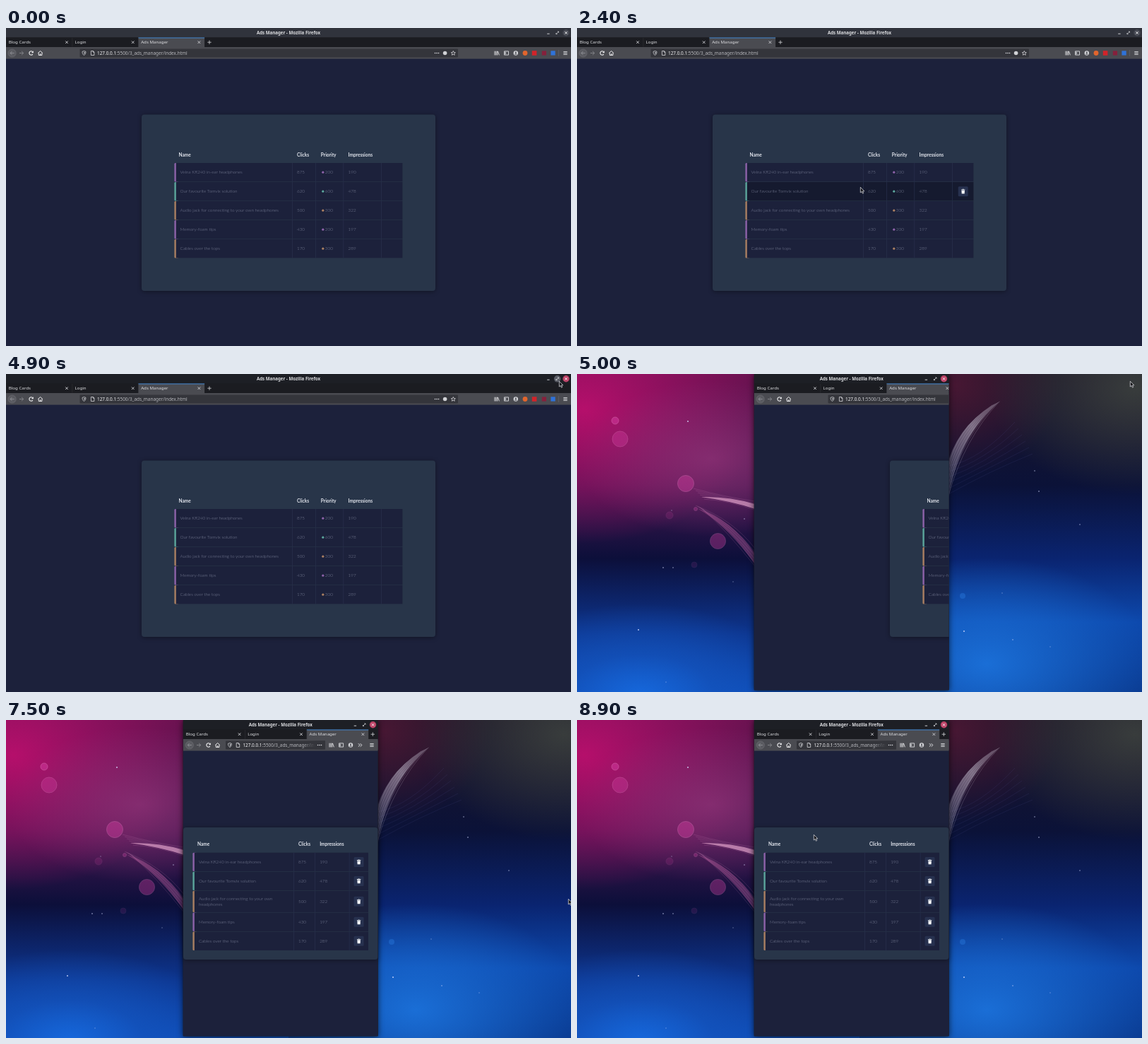
Write an HTML page that moves like this. It is 800x450 px and loops after 9000 ms.

```html
<!DOCTYPE html>
<html lang="en">
<head>
<meta charset="utf-8">
<title>Ads Manager</title>
<style>
html, body { margin: 0; width: 100%; height: 100%; overflow: hidden; background: #1c213b; }
#desk, svg { position: absolute; left: 0; top: 0; width: 800px; height: 450px; }
#desk {
  background:
    radial-gradient(230px 130px at 90px 455px, #1668dc, #1455bfb0 45%, #1455bf00),
    radial-gradient(240px 150px at 580px 410px, #1a6ed6, #1a6ed600),
    radial-gradient(190px 110px at 190px 120px, #8f3478c0, #8f347800),
    radial-gradient(250px 190px at 10px 50px, #b50f6b, #a0106690 55%, #a0106600),
    radial-gradient(210px 150px at 790px 20px, #383c3c, #383c3c00),
    radial-gradient(150px 130px at 535px 15px, #471733, #47173300),
    linear-gradient(#1c1528, #0b1238 35%, #0a2470 58%, #0d49ad 78%, #0a3a90) 400px 0 / 400px 450px no-repeat,
    linear-gradient(#6a1250, #45164f 35%, #0c0f3a 58%, #0d3690 82%, #0e4db8);
}
.ui { font: 6.15px "Noto Sans", sans-serif; fill: #dcdde0; }
.title { font-weight: 700; text-anchor: middle; }
.url { font-size: 6.42px; fill: #f4f4f6; }
.dim { fill: #b6b7bc; }
.cell { font: 300 6.35px Lato, "Open Sans", sans-serif; fill: #7e849b; }
.head { font: 700 6.5px Lato, "Open Sans", sans-serif; fill: #e3e6ee; }
.card { filter: drop-shadow(0 1px 3px #0006); }
.frame { filter: drop-shadow(0 1px 4px #000a); }
</style>
</head>
<body>
<div id="desk"></div>
<svg id="stage" viewBox="0 0 800 450"></svg>
<script>
const LOOP = 9000, STEP = 100;
const PAGE = '#1c213b', CARD = '#283549', LINE = '#2a3350';
const BAR = '#4a4b51', FIELD = '#34353b', TABS = '#1b1c21';
const PURPLE = '#8d62a9', TEAL = '#5ba59c', TAN = '#a97f62';
const ROWS = [
  ['Velna KR240 in-ear headphones', 875, 200, 190, PURPLE],
  ['Our favourite Tomvix solution', 620, 600, 478, TEAL],
  ['Audio jack for connecting to your own headphones', 500, 300, 322, TAN],
  ['Memory-foam tips', 430, 200, 197, PURPLE],
  ['Cables over the tops', 170, 300, 289, TAN]
];
// Pointer: time, x, y
const POINTER = [
  [1200, 428, 291], [1500, 415, 224], [1700, 415, 224], [1800, 406, 206], [1900, 403, 198],
  [2100, 401, 258], [2200, 401, 258], [2400, 401, 225], [2600, 405, 199], [3000, 420, 316],
  [3200, 424, 290], [3500, 440, 359], [3700, 520, 320], [4200, 783, 16], [4900, 783, 10],
  [5200, 783, 10], [5300, 765, 30], [5600, 519, 188], [5900, 265, 320], [6200, 432, 159],
  [6300, 432, 160], [6900, 432, 160], [7000, 432, 159], [7100, 432, 159], [7200, 480, 135],
  [7500, 796, 253], [7800, 560, 440], [8100, 1, 430], [8200, 8, 440], [8900, 335, 162]
];

const rect = (x, y, w, h, fill, r = 0, more = '') =>
  `<rect x="${x}" y="${y}" width="${w}" height="${h}" rx="${r}" fill="${fill}" ${more}/>`;
const disc = (x, y, r, fill, more = '') => `<circle cx="${x}" cy="${y}" r="${r}" fill="${fill}" ${more}/>`;
const text = (x, y, s, cls) => `<text x="${x}" y="${y}" class="${cls}">${s}</text>`;
const path = (d, stroke = '#dddee1', w = 0.9, fill = 'none', more = '') =>
  `<path d="${d}" stroke="${stroke}" stroke-width="${w}" fill="${fill}" ${more}/>`;
const at = (x, y, s) => `<g transform="translate(${x} ${y})">${s}</g>`;
const group = (id, s, more = '') => `<g id="${id}" ${more}>${s}</g>`;
const cross = (r, c) => path(`M${-r} ${-r}L${r} ${r}M${r} ${-r}L${-r} ${r}`, c, 0.9);

const ICON = {
  back: disc(0, 0, 5.6, '#5a5b61', 'stroke="#74757b" stroke-width=".5"') +
    path('M3 0H-2.6M0 -2.6L-2.6 0L0 2.6', '#8f9096'),
  forward: path('M-3 0H2.8M0 -2.7L2.8 0L0 2.7', '#85868c'),
  reload: path('M2.2 1.6A2.7 2.7 0 1 1 2 -1.8', '#f0f0f2', 1.1) + path('M3.2 -3.2V-.3H.3Z', 'none', 0, '#f0f0f2'),
  home: path('M-3.4 .2L0 -3L3.4 .2M-2.3 0V3H2.3V0', '#f0f0f2', 1) + rect(-0.6, 0.8, 1.2, 2.2, '#f0f0f2'),
  shield: path('M0 -3L2.5 -2.1C2.5 .6 1.6 2.2 0 3C-1.6 2.2 -2.5 .6 -2.5 -2.1Z', '#d0d1d5', 0.8) +
    path('M0 -1.8L1.3 -1.3C1.3 .4 .8 1.3 0 1.8Z', 'none', 0, '#d0d1d5'),
  page: path('M-2.2 -3H.8L2.3 -1.5V3H-2.2ZM.6 -3V-1.3H2.3', '#d8d9dc', 0.8),
  dots: [-2.5, 0, 2.5].map(x => disc(x, 0, 0.8, '#e4e5e8')).join(''),
  star: path('M0 -3L.9 -1L3 -.8L1.4 .6L1.9 2.8L0 1.6L-1.9 2.8L-1.4 .6L-3 -.8L-.9 -1Z', '#d8d9dc', 0.8),
  library: path('M-3 -2.8V3M-1.2 -2.8V3M.6 -2.8V3M1.5 -2.6L3.3 2.9', '#dddee1', 1),
  sidebar: path('M-3 -2.6H3V2.6H-3Z', '#dddee1', 0.9) + rect(-2.6, -2, 2.2, 4, '#a8a9ae'),
  account: disc(0, 0, 3.2, '#d5d6da') + disc(0, -0.8, 1.1, BAR) + path('M-2 1.9C-1.4 .3 1.4 .3 2 1.9Z', 'none', 0, BAR),
  more: path('M-2.5 -2.2L-.3 0L-2.5 2.2M.3 -2.2L2.5 0L.3 2.2', '#e6e7ea', 1),
  menu: path('M-2.7 -2H2.7M-2.7 0H2.7M-2.7 2H2.7', '#e6e7ea', 0.9),
  plus: path('M-2.7 0H2.7M0 -2.7V2.7', '#d6d7da', 0.8),
  bin: rect(-7, -7, 14, 14, '#27314f', 1.5) +
    path('M-2.7 -2.8H-1L-.6 -3.4H.6L1 -2.8H2.7V-2H-2.7ZM-2.3 -1.5H2.3L2 3.4H-2Z', 'none', 0, '#f4f5f8')
};
const icons = list => list.map(([x, name]) => at(x, 35.5, ICON[name])).join('');

function tabs(x, w, width, closeAt, plusAt) {
  let s = rect(x, 13, width, 14.2, TABS) + rect(x + 2 * w, 13.4, w, 14, BAR) + rect(x + 2 * w, 13.4, w, 1, '#3f8fe0');
  ['Blog Cards', 'Login', 'Ads Manager'].forEach((name, i) => {
    s += text(x + i * w + 3.8, 22.4, name, 'ui') + at(x + i * w + closeAt, 20.2, cross(1.8, '#d0d1d5'));
    if (i) s += rect(x + i * w, 14, 0.4, 12.6, '#3a3b41');
  });
  return s + at(plusAt, 20.2, ICON.plus);
}

function url(x) {
  return text(x, 37.8, '127.0.0.1<tspan class="dim">:5500/3_ads_manager/index.html</tspan>', 'ui url');
}

function titleBar(x, w, active, hover) {
  const y = 6.8, end = x + w;
  return rect(x, 0, w, 13.2, active ? '#1d1f25' : '#30333c') +
    text(x + w / 2, 8.8, 'Ads Manager - Mozilla Firefox', 'ui title') +
    path(`M${end - 33.8} 8.2h3.4`, '#e0e1e4', 0.9) +
    (hover ? disc(end - 19.3, y, 4.8, '#5a5d66') : '') +
    at(end - 19.3, y, path('M-1.7 1.7L1.7 -1.7M.2 -1.8H1.8V-.2M-1.8 .2V1.8H-.2', '#e6e7ea', 0.7)) +
    disc(end - 7, y, 4.7, active ? '#bd4468' : '#474a54') + at(end - 7, y, cross(1.7, '#fff'));
}

// edges: row tops plus the final bottom; cols: column lines
function table({ x, right, edges, cols, textX, headY, wide }) {
  const heads = wide ? ['Name', 'Clicks', 'Priority', 'Impressions'] : ['Name', 'Clicks', 'Impressions'];
  let s = heads.map((h, i) => text(i ? textX[i] : textX[0] - 2, headY, h, 'head')).join('');
  ROWS.forEach(([name, clicks, priority, shown, color], i) => {
    const top = edges[i], h = edges[i + 1] - top - 0.6, mid = top + h / 2, base = mid + 2.1;
    s += rect(x, top, 6, h, color, 1.5) + rect(x + 2.4, top, right - x - 2.4, h, PAGE, 0, wide ? `id="row${i}"` : '');
    cols.forEach(c => s += rect(c, top, 0.6, h, LINE));
    if (!wide && i === 2) {
      s += text(textX[0], base - 4.4, name.slice(0, 38), 'cell') + text(textX[0], base + 4.2, name.slice(38), 'cell');
    } else s += text(textX[0], base, name, 'cell');
    const values = wide ? [clicks, priority, shown] : [clicks, shown];
    values.forEach((v, k) => s += text(textX[k + 1] + (wide && k === 1 ? 6 : 0), base, v, 'cell'));
    if (wide) s += disc(448.8, mid, 1.6, color);
    s += group(wide ? `bin${i}` : `small${i}`, at(wide ? 546.7 : 499.6, mid, ICON.bin));
  });
  return s;
}

function widePage() {
  return rect(0, 13, 800, 437, PAGE) + tabs(0, 93.7, 800, 86, 288) +
    rect(0, 27, 800, 16.6, BAR) + rect(104.5, 29.4, 535.5, 12, FIELD, 1) + url(129) +
    icons([[8.6, 'back'], [22, 'forward'], [35.6, 'reload'], [48.6, 'home'], [110.5, 'shield'], [122.6, 'page'],
      [610, 'dots'], [633.3, 'star'], [695, 'library'], [708.5, 'sidebar'], [721.8, 'account'], [792, 'menu']]) +
    disc(621.6, 35.5, 2.8, '#d0d1d5') + disc(735, 35.5, 3.4, '#e2652d') + rect(744.8, 32.2, 6.6, 6.6, '#d2232a') +
    rect(758.8, 32.4, 6.2, 6.2, '#85203c') + rect(771.4, 32.3, 6.3, 6.3, '#2f73d9') +
    rect(782.5, 31, 0.5, 9, '#6c6d73') +
    rect(192, 122.4, 416, 249.6, CARD, 4, 'class="card"') +
    table({ x: 238.4, right: 561.4, edges: [191, 218, 245, 272, 299, 326], cols: [405, 438.3, 477.5, 531.4],
      textX: [246.6, 412, 445.8, 484.6], headY: 182, wide: true });
}

function narrowPage() {
  return rect(251, 13, 275.5, 434, PAGE) + tabs(251, 87.4, 275.5, 79.6, 519.3) +
    rect(251, 27, 275.5, 16.6, BAR) + rect(311, 29.4, 141, 12, FIELD, 1) + url(335.4) +
    rect(420, 29.6, 18, 11.6, 'url(#fade)') + rect(438, 29.4, 14, 12, FIELD) + rect(452, 29, 74.5, 13, BAR) +
    icons([[259.8, 'back'], [273, 'forward'], [286.6, 'reload'], [299.6, 'home'], [317, 'shield'], [328.4, 'page'],
      [444, 'dots'], [461, 'library'], [474.6, 'sidebar'], [488, 'account'], [501.4, 'more'], [518, 'menu']]) +
    rect(251, 152, 275.5, 187, CARD, 4, 'class="card"') +
    table({ x: 264.4, right: 513, edges: [187.7, 214.7, 241.7, 272.6, 299.6, 326.6], cols: [407.4, 437.4, 485.8],
      textX: [273, 414, 444.2], headY: 178.4, wide: false });
}

function wallpaper() {
  let s = '';
  [[54, 66, 5, 0.5], [61, 92, 11, 0.35], [154, 155, 11.5, 0.4], [199.5, 236.5, 11, 0.35],
    [168, 191, 2.5, 0.3], [131, 200, 5, 0.15], [166, 270, 4, 0.12]].forEach(([x, y, r, o]) =>
    s += disc(x, y, r, '#d83fa5', `opacity="${o}" stroke="#f08acc" stroke-width=".8"`));
  s += disc(546, 314, 4, '#2b7de0', 'opacity=".4"');
  [[157, 67], [134, 193], [237, 205], [122, 274], [136, 274], [221, 294], [87, 362], [126, 436], [648, 137],
    [654, 166], [712, 213], [602, 310], [548, 364], [670, 386], [617, 376]].forEach(([x, y], i) =>
    s += disc(x, y, i % 3 ? 0.7 : 1, '#d5dcff', `opacity="${i % 2 ? 0.5 : 0.85}"`));
  const haze = 'opacity=".4"';
  s += path('M176 174Q215 173 252 184V191Q220 180 176 174Z', 'none', 0, '#e7a9d0', 'opacity=".65"');
  s += path('M170 190Q215 215 252 270V254Q218 205 170 190Z', 'none', 0, '#b85a9c', haze);
  for (let i = 0; i < 6; i++) {
    s += path(`M${165 + i * 3} ${162 + i * 3}Q${210 + i} ${174 + i} 252 ${180 + i * 2.5}`, '#e79ccb', 0.4, 'none', haze);
    s += path(`M${168 + i * 2} ${186 + i}Q${222 - i * 2} ${207 + i * 3} 252 ${247 + i * 5}`, '#d88fc0', 0.4, 'none', haze);
    s += path(`M526 ${130 + i * 8}Q${570 + i * 3} ${122 + i * 3} ${620 + i * 5} ${68 + i * 9}`, '#6a6fc0', 0.4, 'none', 'opacity=".28"');
    s += path(`M526 ${172 - i * 8}Q${548 - i * 2} ${92 - i * 3} ${598 - i * 2} ${39 + i}`, '#d6cde0', 0.5, 'none', haze);
  }
  return s + path('M526 180Q538 88 600 38Q545 65 526 122Z', 'none', 0, 'url(#feather)');
}

const stage = document.getElementById('stage');
stage.innerHTML = `<defs>
  <linearGradient id="fade"><stop stop-color="${FIELD}" stop-opacity="0"/><stop offset="1" stop-color="${FIELD}"/></linearGradient>
  <linearGradient id="feather" x1="0" y1="1" x2="1" y2="0"><stop stop-color="#a9a4bd" stop-opacity=".15"/>
  <stop offset=".6" stop-color="#b9b2c4" stop-opacity=".55"/><stop offset="1" stop-color="#a59bab" stop-opacity=".2"/></linearGradient>
  <clipPath id="crop">${rect(251, 0, 275.5, 447, '#000')}</clipPath></defs>` +
  group('back', wallpaper() + rect(250.6, 0, 276.2, 447.6, '#1d1f25', 1, 'class="frame"')) +
  group('crop-box', group('wide', widePage())) +
  group('narrow', narrowPage()) +
  group('idle', titleBar(0, 800, false, false)) +
  group('focus', titleBar(0, 800, true, true)) +
  group('small', titleBar(251, 275.5, true, false)) +
  group('pointer', path('M.3 .3V8L2.1 6.4L3.4 9.2L4.7 8.6L3.4 5.9H5.8Z', '#e8e9ec', 0.7, '#14151a'));

const byId = id => document.getElementById(id);
const show = (id, on) => { byId(id).style.display = on ? '' : 'none'; };

function pointerAt(t) {
  if (t < POINTER[0][0]) return null;
  const i = POINTER.findIndex(p => p[0] >= t);
  const b = POINTER[i], a = POINTER[Math.max(0, i - 1)];
  const k = b[0] === a[0] ? 0 : (t - a[0]) / (b[0] - a[0]);
  return [a[1] + (b[1] - a[1]) * k, a[2] + (b[2] - a[2]) * k];
}

function draw(time) {
  const t = Math.floor((time % LOOP) / STEP) * STEP;
  const restored = t >= 5000, reflowed = t >= 5100, focused = t >= 4800;
  byId('desk').style.display = restored ? '' : 'none';
  show('back', restored);
  show('crop-box', !reflowed);
  show('narrow', reflowed);
  show('idle', !focused);
  show('focus', focused && !restored);
  show('small', restored);
  byId('wide').setAttribute('transform', `translate(${restored ? 251 : 0} 0)`);
  if (restored) byId('crop-box').setAttribute('clip-path', 'url(#crop)');
  else byId('crop-box').removeAttribute('clip-path');

  const p = pointerAt(t);
  show('pointer', p);
  if (p) byId('pointer').setAttribute('transform', `translate(${p[0]} ${p[1]})`);
  const over = p && !restored && p[0] > 241 && p[0] < 561 ? Math.floor((p[1] - 191) / 27) : -1;
  ROWS.forEach((_, i) => {
    byId(`row${i}`).setAttribute('fill', i === over ? '#151a2f' : PAGE);
    show(`bin${i}`, i === over);
  });
}

const start = performance.now();
function tick() {
  draw(performance.now() - start);
  requestAnimationFrame(tick);
}
tick();
</script>
</body>
</html>
```
